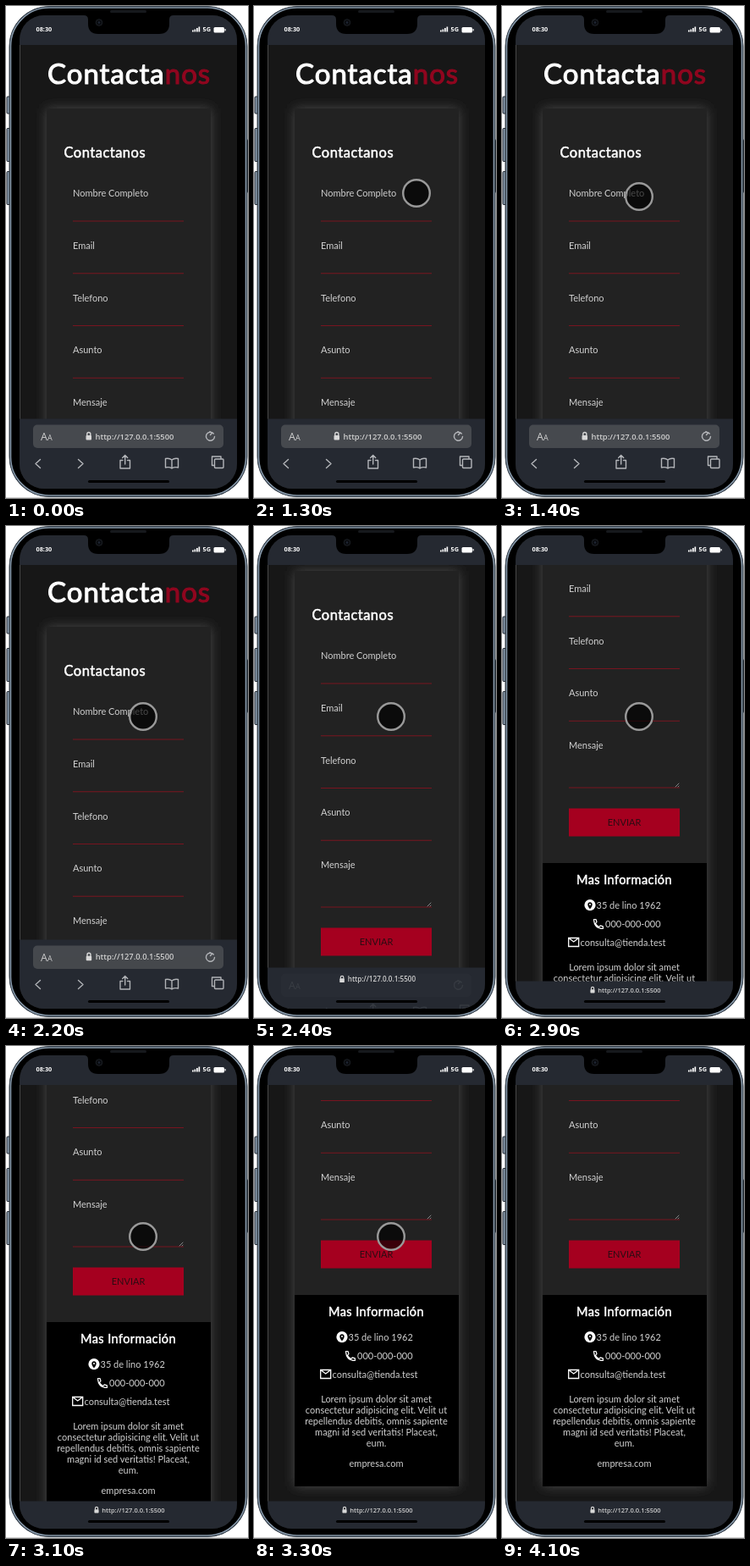
Write an HTML page that moves like this. It is 286 by 581 pixels and loops after 5.6 s.

```html
<!DOCTYPE html>
<html lang="es">
<head>
<meta charset="utf-8">
<title>Contactanos</title>
<style>
@property --s { syntax: '<number>'; inherits: true; initial-value: 0; }
html, body { margin: 0; height: 100%; overflow: hidden; background: #fff; }
svg { display: block; width: 100%; height: 100%; animation: scroll 5.6s step-end infinite; --p: min(1, var(--s) / 100); }
text { font-family: Lato, sans-serif; font-size: 11px; fill: #d0d0d0; }
.page { transform: translateY(calc(var(--s) * -1px)); }
.bar { transform: translateY(calc(var(--p) * 50px)); }
.tools { opacity: calc(1 - var(--p) * 1.3); }
.url { transform: translate(calc(146.5px - var(--p) * .5px), calc(508px + var(--p) * 40px)) scale(calc(1 - var(--p) * .2)); }
.h1, .h2, .h3 { fill: #fff; stroke: #fff; stroke-linejoin: round; letter-spacing: .03em; }
.h1 { font-size: 33px; stroke-width: 1.1; }
.h2 { font-size: 16.5px; stroke-width: .55; }
.h3 { font-size: 14.5px; stroke-width: .5; }
.red { fill: #90061f; stroke: #90061f; }
.sys, .sys text { font-family: 'Open Sans', sans-serif; font-weight: 600; }
.status text { font-size: 7.3px; font-weight: 700; fill: #fff; }
.mid { text-anchor: middle; }
.rule { stroke: #78141f; stroke-width: 1.2; }
.line { fill: none; stroke: #b4b6ba; stroke-width: 1.4; stroke-linecap: round; stroke-linejoin: round; }
.touch { opacity: 0; animation: touch 5.6s step-end infinite; }
@keyframes scroll {
  0% { --s: 0; }
  39.28% { --s: 2; }
  41.07% { --s: 22; }
  42.85% { --s: 68; }
  44.64% { --s: 118; }
  46.42% { --s: 151; }
  48.21% { --s: 160; }
  50% { --s: 175; }
  51.78% { --s: 209; }
  53.57% { --s: 247; }
  55.35% { --s: 281; }
  57.14% { --s: 303; }
  58.92%, 100% { --s: 313; }
}
@keyframes touch {
  0% { opacity: 0; transform: translate(192px, 221px); }
  23.21% { opacity: 1; transform: translate(192px, 221px); }
  25% { opacity: 1; transform: translate(162px, 225px); }
  73.21%, 100% { opacity: 0; transform: translate(162px, 225px); }
}
</style>
</head>
<body>
<svg viewBox="0 0 286 581">
  <defs>
    <clipPath id="screen"><rect x="16" y="11" width="257" height="559" rx="29"/></clipPath>
    <filter id="glow" x="-20%" y="-10%" width="140%" height="120%"><feGaussianBlur stdDeviation="7"/></filter>
  </defs>

  <path d="M0 580.5H286" stroke="#d4d4d4"/>
  <g fill="#8496a8" stroke="#1c232b">
    <rect x="1" y="107" width="5" height="20" rx="1"/>
    <rect x="1" y="144.5" width="5" height="39" rx="1"/>
    <rect x="1" y="195.500" width="5" height="39" rx="1"/>
    <rect x="282" y="157.500" width="3.500" height="63" rx="1"/>
  </g>
  <rect x="4" y=".5" width="281" height="579" rx="47" fill="#000" stroke="#36424f"/>
  <rect x="5.500" y="2" width="278" height="576" rx="45.500" fill="none" stroke="#8799ab" stroke-width="1.600"/>

  <g clip-path="url(#screen)">
    <rect x="16" y="11" width="257" height="559" fill="#171717"/>
    <g class="page">
      <rect x="48" y="121" width="194" height="712" fill="#464646" filter="url(#glow)"/>
      <rect x="48" y="121" width="194" height="487" fill="#222"/>
      <rect x="48" y="607" width="194" height="226" fill="#000"/>
      <text class="h1" x="49" y="92">Contacta<tspan class="red">nos</tspan></text>
      <text class="h2" x="68.5" y="179">Contactanos</text>
      <g id="form"></g>
      <path d="M205 517l4-4M208 517l1-1" class="line" style="stroke-width:.7"/>
      <rect x="79" y="542.5" width="131" height="33" fill="#a5001f"/>
      <text class="mid" x="144.5" y="563" style="fill:#2b0c13">ENVIAR</text>

      <text class="h3 mid" x="144.5" y="632">Mas Información</text>
      <circle cx="104" cy="656.7" r="6.6" fill="#fff"/>
      <path d="M104 661.2c-4-4.2-3.2-8 0-8s4 3.8 0 8z"/>
      <circle cx="104" cy="656" r="1" fill="#fff"/>
      <text x="111.5" y="661">35 de lino 1962</text>
      <path d="M108.5 673.5h2.5l1 3.2-1.6 1.6q1.5 3 4.200 4.200l1.700-1.600 3.100 1v2.600q-10.500 0-10.900-11z" fill="none" stroke="#fff" stroke-width="1.2" stroke-linejoin="round"/>
      <text x="122" y="683">000-000-000</text>
      <path d="M78.7 695.5h12v10h-12zl6 4.5 6-4.5" fill="none" stroke="#fff" stroke-width="1.3"/>
      <text x="92.5" y="704.5">consulta@tienda.test</text>
      <g id="blurb"></g>
      <text class="mid" x="144.5" y="809.5">empresa.com</text>
    </g>
    <path d="M16.5 46V540" stroke="#484848"/>

    <rect x="16" y="11" width="257" height="35" fill="#252931"/>
    <rect class="bar" x="16" y="487.5" width="257" height="90" fill="#252931"/>
    <g class="tools sys">
      <g class="bar">
        <rect x="32" y="494.5" width="225" height="27.5" rx="5" fill="#46494e"/>
        <text x="41" y="513" style="font-size:12.5px;font-weight:400">A<tspan style="font-size:9px">A</tspan></text>
        <g class="line">
          <path d="M245.3 505a5 5 0 1 0 1.200 3.500M241 502.500l2.500 1.800-2 2.200"/>
          <path d="M40.5 535.5l-5.5 5 5.5 5M85.5 535.5l5.5 5-5.5 5"/>
          <path d="M138 536.5h-3v9.500h11.500v-9.500h-3M140.700 541v-10M137.700 533.500l3-3 3 3"/>
          <path d="M196 536q-3-2.5-7.5-1.5v10.5q4.5-1 7.5 1 3-2 7.5-1v-10.5q-4.5-1-7.5 1.5v10"/>
          <path d="M246 542.5h-2.5v-10.500h10.500v2.500"/>
          <rect x="246.5" y="535" width="10.5" height="10.5" rx="1"/>
        </g>
      </g>
    </g>
    <g class="url sys">
      <rect x="-52" y="-1" width="6.5" height="5.5" rx="1" fill="#d8d8d8"/>
      <path d="M-50.7-1v-1.500a2 2 0 0 1 4 0v1.500" class="line" style="stroke:#d8d8d8"/>
      <text x="-41" y="3.5" style="font-size:9.4px">http://127.0.0.1:5500</text>
    </g>
    <rect x="97" y="560" width="96" height="3" rx="1.5" fill="#000"/>
  </g>

  <path d="M92 11q5 0 5 5v5q0 12 12 12h72q12 0 12-12v-5q0-5 5-5z"/>
  <rect x="123" y="5" width="43" height="3" rx="1.5" fill="#16181c"/>
  <circle cx="110" cy="19.5" r="3.800" fill="#0a0c10" stroke="#22262c" stroke-width=".8"/>
  <circle cx="110" cy="19.5" r="1.2" fill="#1f2634"/>
  <g class="sys status" fill="#fff">
    <text x="35.5" y="30.3">08:30</text>
    <path d="M220 28.5h1.700v2h-1.700zM222.500 27.500h1.700v3h-1.700zM225 26h1.700v4.500h-1.700zM227.500 24.500h1.700v6h-1.700z"/>
    <text x="232.5" y="30.3">5G</text>
    <rect x="245.5" y="25" width="12.5" height="6.5" rx="1.5"/>
    <rect x="258.5" y="27" width="1.2" height="2.5" rx=".5"/>
  </g>

  <circle class="touch" r="15.8" fill="#000" fill-opacity=".65" stroke="#999" stroke-width="2.4"/>
</svg>
<script>
const fill = (id, rows, draw) => document.getElementById(id).innerHTML = rows.map(draw).join('');

fill('form', ['Nombre Completo', 'Email', 'Telefono', 'Asunto', 'Mensaje'], (label, i) => {
  const y = 225 + i * 61.75;
  const base = i < 4 ? y + 29 : 518;
  return `<text x="79" y="${y}">${label}</text><path class="rule" d="M79 ${base}H210"/>`;
});

fill('blurb', [
  'Lorem ipsum dolor sit amet',
  'consectetur adipisicing elit. Velit ut',
  'repellendus debitis, omnis sapiente',
  'magni id sed veritatis! Placeat,',
  'eum.'
], (row, i) => `<text class="mid" x="144.5" y="${734 + i * 13.1}">${row}</text>`);
</script>
</body>
</html>
```
